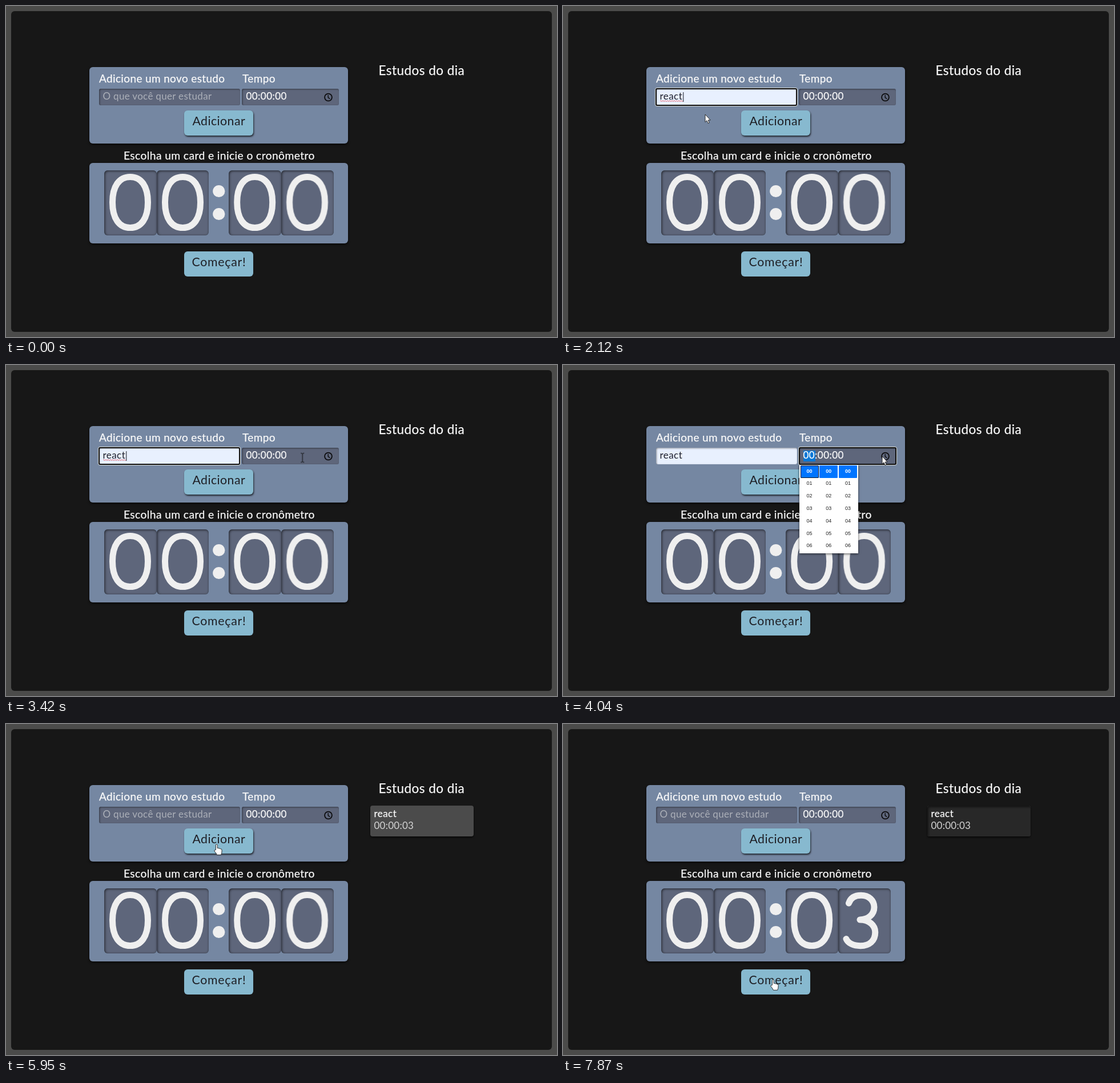
An HTML page for the animation above (8 s loop, 965 by 580 pixels).

```html
<!DOCTYPE html>
<html lang="pt-BR">
<head>
<meta charset="utf-8">
<title>Estudos do dia</title>
<style>
html, body { margin: 0; width: 100%; height: 100%; overflow: hidden; background: #4b4b4a; }
#stage { position: relative; width: 965px; height: 580px; overflow: hidden; }
#stage div, svg { position: absolute; box-sizing: border-box; }
svg { left: 0; top: 0; }

/* boxes */
.page { left: 9px; top: 9px; width: 947px; height: 562px; border-radius: 6px; background: #171717; }
.panel { left: 146px; width: 453px; border-radius: 6px; background: #7587a2; box-shadow: 0 2px 4px #000a; }
.field { top: 145px; height: 28.5px; border-radius: 3px; background: #5e667b; box-shadow: inset 1px 1px 3px #0007; }
.name { left: 163px; width: 246.5px; }
.time { left: 413px; width: 170px; }
.filled { background: #e8f0fe; box-shadow: inset 1px 1px 3px #0006; }
.ring { top: 144px; height: 30.5px; border: 2px solid #101010; border-radius: 3px; box-shadow: 0 0 0 1px #e8e8e0d0; }
.digit { top: 288px; width: 92px; height: 114px; border-radius: 6px; background: #5e667b; box-shadow: inset 1px 1px 4px #000a; }
.button { left: 312px; width: 121px; height: 44px; border-radius: 6px; background: #87b9cf; }
.card { left: 638px; top: 142.5px; width: 181px; height: 54.5px; border-radius: 4px; background: #4b4b4b; box-shadow: 0 2px 3px #000a; }
.chosen { background: #282828; box-shadow: inset 2px 3px 3px #171717; }

/* text */
text { font-family: Lato, "Open Sans", sans-serif; fill: #f2f2f2; }
.label { font-size: 19px; letter-spacing: .36px; }
.hint { font-size: 19.3px; letter-spacing: .38px; }
.head { font-size: 22.5px; letter-spacing: .46px; }
.value { font-size: 17px; letter-spacing: .45px; }
.label, .hint, .head, .bright { fill: #fafafa; stroke: #fafafa; stroke-width: .25px; }
.ghost { font-size: 17px; letter-spacing: .32px; fill: #acb0b9; }
.dark { fill: #1d1f2b; }
.act { font-size: 21.3px; letter-spacing: .42px; fill: #1f2026; }
.wide { letter-spacing: .75px; }
.soft { fill: #d4d4d4; letter-spacing: .25px; }
.big { fill: none; stroke: #efefef; stroke-width: 11px; stroke-linecap: round; stroke-linejoin: round; }

/* suggestion list and time picker */
.list { left: 162px; top: 176px; width: 248px; height: 38.5px; border-radius: 2px; background: #fff; box-shadow: 0 1px 3px #0008; }
.list div { left: 0; top: 8px; width: 248px; height: 23px; padding-left: 9px; font: 8.5px/23px "Open Sans", sans-serif; color: #222; }
.list .over { background: #e6e6e6; }
.picker { left: 413.5px; top: 175px; width: 103.5px; height: 155px; background: #fff; box-shadow: 0 1px 4px #000a; overflow: hidden; font: 9px/21.8px "Liberation Sans", Arial, sans-serif; color: #222; text-align: center; }
.col { top: .7px; width: 32px; height: 154px; white-space: pre-line; }
.c1 { left: 2px; } .c2 { left: 35.7px; } .c3 { left: 69.5px; }
.picker .row { left: 0; width: 32px; height: 22px; }
.pick { top: 0; background: #0075ff; color: #fff; font-weight: bold; border-radius: 1px; }
.edge { top: 0; border: 1px solid #0a1a30; border-radius: 2px; }
.r3 { top: 65.5px; } .r4 { top: 87.3px; }
.hover { background: #aed1fd; }

/* timing */
[style] { animation: 8s step-end -5ms infinite; animation-name: var(--k); }
@keyframes empty { 0% { opacity: 1 } 20% { opacity: 0 } 74.375%, to { opacity: 1 } }
@keyframes fill { 0% { opacity: 0 } 20% { opacity: 1 } 74.375%, to { opacity: 0 } }
@keyframes nameFocus { 0% { opacity: 0 } 13.625% { opacity: 1 } 48%, to { opacity: 0 } }
@keyframes list { 0% { opacity: 0 } 13.625% { opacity: 1 } 25.25%, to { opacity: 0 } }
@keyframes listOver { 0% { opacity: 0 } 20% { opacity: 1 } 25.25%, to { opacity: 0 } }
@keyframes spell { 0% { opacity: 0 } 25.25% { opacity: 1 } 48%, to { opacity: 0 } }
@keyframes caretStart { 0% { opacity: 0 } 13.625% { opacity: 1 } 20%, to { opacity: 0 } }
@keyframes caretEnd { 0% { opacity: 0 } 25.25% { opacity: 1 } 32.75% { opacity: 0 } 39% { opacity: 1 } 44%, to { opacity: 0 } }
@keyframes timeFocus { 0% { opacity: 0 } 48% { opacity: 1 } 73.125%, to { opacity: 0 } }
@keyframes picker { 0% { opacity: 0 } 49.25% { opacity: 1 } 73.125%, to { opacity: 0 } }
@keyframes hourEdge { 0% { opacity: 1 } 64.25%, to { opacity: 0 } }
@keyframes secEdge { 0% { opacity: 0 } 64.25% { opacity: 1 } 65.5%, to { opacity: 0 } }
@keyframes sec0 { 0% { opacity: 1 } 65.5%, to { opacity: 0 } }
@keyframes sec3 { 0% { opacity: 0 } 65.5%, to { opacity: 1 } }
@keyframes over3 { 0% { opacity: 0 } 56.75% { opacity: 1 } 58% { opacity: 0 } 63% { opacity: 1 } 65.5%, to { opacity: 0 } }
@keyframes over4 { 0% { opacity: 0 } 58% { opacity: 1 } 63%, to { opacity: 0 } }
@keyframes time0 { 0% { opacity: 1 } 65.5% { opacity: 0 } 74.375%, to { opacity: 1 } }
@keyframes time3 { 0% { opacity: 0 } 65.5% { opacity: 1 } 74.375%, to { opacity: 0 } }
@keyframes card { 0% { opacity: 0 } 74.375%, to { opacity: 1 } }
@keyframes chosen { 0% { opacity: 0 } 87.125%, to { opacity: 1 } }
@keyframes unchosen { 0% { opacity: 1 } 87.125%, to { opacity: 0 } }

@keyframes arrow {
  0% { opacity: 0 } 2.125% { opacity: 1 } 11.125% { opacity: 0 } 16.25% { opacity: 1 }
  40.25% { opacity: 0 } 44% { opacity: 1 } 71.875% { opacity: 0 } 80.625% { opacity: 1 }
  83.125% { opacity: 0 } 88.375% { opacity: 1 } 95.875%, to { opacity: 0 }
}
@keyframes beam {
  0% { opacity: 0 } 11.125% { opacity: 1 } 16.25% { opacity: 0 } 40.25% { opacity: 1 } 44%, to { opacity: 0 }
}
@keyframes hand {
  0% { opacity: 0 } 71.875% { opacity: 1 } 80.625% { opacity: 0 } 83.125% { opacity: 1 }
  88.375% { opacity: 0 } 95.875%, to { opacity: 1 }
}
@keyframes click {
  0%, 13.625%, 25.25%, 49.25%, 65.5%, 74.375%, 87.125%, 98.375%, to { opacity: 0 }
  12.375%, 24%, 48%, 64.25%, 73.125%, 85.875%, 97.125% { opacity: 1 }
}
@keyframes move {
  0% { transform: translate(861px, 454px) }
  2.125% { transform: translate(861px, 454px); animation-timing-function: steps(8, start) }
  12.375% { transform: translate(305px, 165px) }
  16.25% { transform: translate(305px, 165px); animation-timing-function: steps(2, start) }
  18.75% { transform: translate(287px, 179px) }
  20% { transform: translate(287px, 179px); animation-timing-function: steps(2, start) }
  22.75% { transform: translate(250px, 196px) }
  25.25% { transform: translate(249px, 190px) }
  34% { transform: translate(249px, 190px); animation-timing-function: steps(9, start) }
  45.25% { transform: translate(553px, 159px) }
  48% { transform: translate(559px, 160px) }
  51.75% { transform: translate(559px, 160px); animation-timing-function: steps(6, start) }
  59.25% { transform: translate(499px, 266px) }
  61.75% { transform: translate(499px, 266px); animation-timing-function: steps(3, start) }
  65.5% { transform: translate(505px, 252px) }
  69.375% { transform: translate(505px, 252px); animation-timing-function: steps(3, start) }
  73.125% { transform: translate(369px, 211px) }
  80.625% { transform: translate(369px, 211px); animation-timing-function: steps(3, start) }
  84.375% { transform: translate(711px, 168px) }
  88.375% { transform: translate(711px, 168px); animation-timing-function: steps(7, start) }
  97.125%, to { transform: translate(368px, 448px) }
}
</style>
</head>
<body>
<div id="stage">
  <div class="page"></div>
  <div class="panel" style="top:106.5px;height:134.5px"></div>
  <div class="panel" style="top:275px;height:140.5px"></div>
  <div class="field name"></div>
  <div class="field name filled" style="--k:fill"></div>
  <div class="ring" style="--k:nameFocus;left:162px;width:248px"></div>
  <div class="field time"></div>
  <div class="ring" style="--k:timeFocus;left:412.5px;width:171px"></div>
  <div style="--k:timeFocus;left:421px;top:150px;width:20.5px;height:19px;background:#0a78d6"></div>
  <div class="digit" style="left:172px"></div>
  <div class="digit" style="left:264px;width:91px"></div>
  <div class="digit" style="left:390px"></div>
  <div class="digit" style="left:482px"></div>
  <div class="button" style="top:183px;box-shadow:1px 2px 3px #000b"></div>
  <div class="button" style="top:430px"></div>
  <div class="card" style="--k:card"></div>
  <div class="card chosen" style="--k:chosen"></div>

  <svg width="965" height="580" viewBox="0 0 965 580">
    <defs>
      <path id="zero" d="M0-44.5C19.5-44.5 31-28 31 0S19.5 44.5 0 44.5S-31 28-31 0S-19.5-44.5 0-44.5Z"/>
    </defs>
    <text class="label" x="163" y="134">Adicione um novo estudo</text>
    <text class="label" x="414" y="134">Tempo</text>
    <text class="head" x="652.5" y="121">Estudos do dia</text>
    <text class="ghost" x="169.5" y="164" style="--k:empty">O que você quer estudar</text>
    <text class="value dark" x="169.5" y="164" style="--k:fill">react</text>
    <path d="M170 166.5q1-1.6 2 0t2 0t2 0t2 0t2 0t2 0t2 0t2 0t2 0t2 0t2 0t2 0t2 0t2 0t2 0t2 0t2 0t2 0t2 0t2 0" fill="none" stroke="#e0404a" stroke-width=".8" style="--k:spell"/>
    <path d="M170.5 151v17" stroke="#e8e8e8" style="--k:caretStart"/>
    <path d="M210.8 151v17" stroke="#15171f" style="--k:caretEnd"/>
    <text class="value bright" x="420.5" y="164" style="--k:time0">00:00:00</text>
    <text class="value bright" x="420.5" y="164" style="--k:time3">00:00:03</text>
    <g fill="none" stroke="#0c0c0e" stroke-width="1.8">
      <circle cx="564.5" cy="160" r="6.4"/>
      <path d="M564.2 156v4.4l3 2.2" stroke-width="1.4"/>
    </g>
    <text class="act" x="326.5" y="209">Adicionar</text>
    <text class="hint" x="206" y="269">Escolha um card e inicie o cronômetro</text>
    <text class="act wide" x="325.5" y="456">Começar!</text>
    <g class="big" role="img" aria-label="cronômetro">
      <use href="#zero" x="217.5" y="344"/>
      <use href="#zero" x="309.5" y="344"/>
      <use href="#zero" x="435.7" y="344"/>
      <use href="#zero" x="527.5" y="344" style="--k:unchosen"/>
      <path d="M500.5 314C503.5 305 511 300.3 522 300.3C535.5 300.3 545 309 545 321C545 334 534.5 342.5 520 343C536.5 343 546.8 353 546.8 365C546.8 380 536.5 388.7 521 388.7C508.5 388.7 499 384 496 376.5" style="--k:chosen"/>
    </g>
    <circle cx="372.8" cy="324.5" r="10.6" fill="#efefef"/>
    <circle cx="372.8" cy="364.5" r="10.6" fill="#efefef"/>
    <g style="--k:card">
      <text class="value bright" x="644.5" y="163">react</text>
      <text class="value soft" x="644.5" y="184">00:00:03</text>
    </g>
  </svg>

  <div class="list" style="--k:list">
    <div class="over" style="--k:listOver"></div>
    <div>react</div>
  </div>

  <div class="picker" style="--k:picker">
    <div class="col c1">00
      01
      02
      03
      04
      05
      06
      <div class="row pick">00</div>
      <div class="row edge" style="--k:hourEdge"></div>
    </div>
    <div class="col c2">00
      01
      02
      03
      04
      05
      06
      <div class="row pick">00</div>
    </div>
    <div class="col c3">
      <div class="row r3 hover" style="--k:over3"></div>
      <div class="row r4 hover" style="--k:over4"></div>
      <div class="col" style="left:0;top:0">00
        01
        02
        03
        04
        05
        06</div>
      <div class="row pick" style="--k:sec0">00</div>
      <div class="row pick r3" style="--k:sec3">03</div>
      <div class="row edge" style="--k:secEdge"></div>
    </div>
  </div>

  <svg width="965" height="580" viewBox="0 0 965 580">
    <g style="--k:move">
      <circle cx="-.5" cy=".8" r="9.5" fill="#e1e100" fill-opacity=".6" style="--k:click"/>
      <path d="M0 0V13.4L3 10.7L5 15.6L7.2 14.7L5.2 9.9H9.2Z" fill="#fff" stroke="#1c1c1c" stroke-width=".9" stroke-linejoin="round" style="--k:arrow"/>
      <path d="M-3-8Q0-8 0-6.5Q0-8 3-8M0-6.5V6.5M-3 8Q0 8 0 6.5Q0 8 3 8" fill="none" stroke="#0c0c0c" style="--k:beam"/>
      <path d="M-1.6 9.6V1.2Q-1.6-.2-.2-.2T1.2 1.2V6.5Q3.6 5.8 4 7.2Q6 6.4 6.6 8Q8.8 7.6 9 9.4V13Q9 15 7.6 18.3H.4Q-.6 15.5-4 11.8Q-4.4 9.6-2.9 9.8Z" fill="#fff" stroke="#1c1c1c" stroke-width=".9" stroke-linejoin="round" style="--k:hand"/>
    </g>
  </svg>
</div>
</body>
</html>
```
